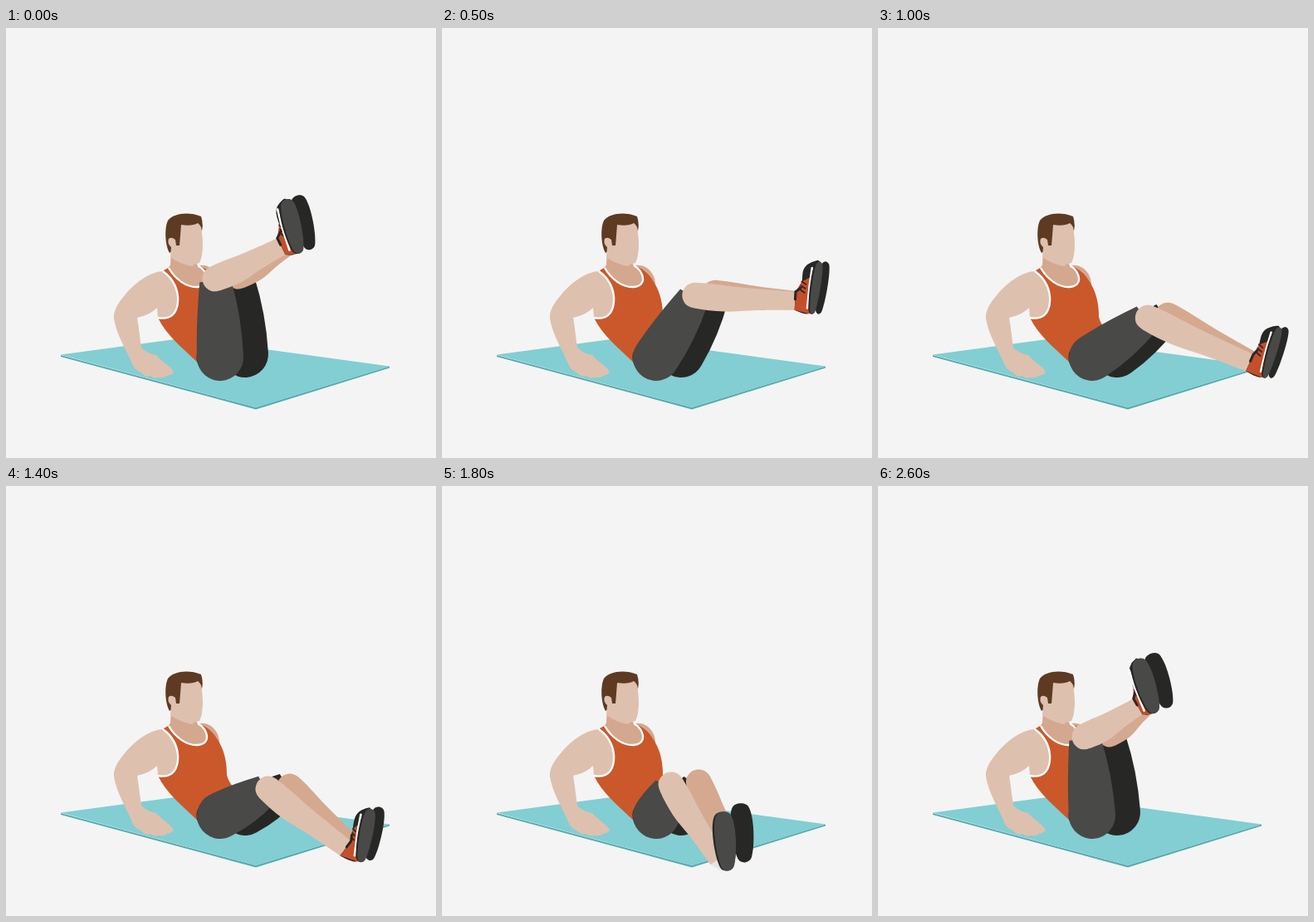
Write an HTML page that moves like this. It is 518 px wide and 518 px high and loops after 2.7 s.

```html
<!DOCTYPE html>
<html lang="en">
<head>
<meta charset="utf-8">
<title>Leg circles</title>
<style>
html, body { margin: 0; width: 100%; height: 100%; overflow: hidden; background: #f4f4f4; }
svg { display: block; width: 100%; height: 100%; }
</style>
</head>
<body>
<svg viewBox="0 0 518 518">
  <rect width="518" height="518" fill="#f4f4f4"/>
  <path d="M66 394L301 457L462 407.500V409.500L301 459.500L66 396Z" fill="#57abb3"/>
  <path d="M66 393.500L214.500 373.500L462 407.500L301 457Z" fill="#82ced2"/>

  <path d="M229 287C242 282 258 292 257 312L238 312Z" fill="#d4a78f"/>
  <path d="M190 292L197 288C205 286 225 284 231 286C246 291 251 299 257 309C263 320 266 332 266 348C268 356 272 361 276 365L262 395L231 403C212 385 194 371 183 349Z" fill="#cb582a"/>
  <path d="M199 268L198 285L196 289C204 303 218 313 231 312C242 311 245 303 239 293Q235 288 231 287L226 276Z" fill="#d4a78f"/>
  <path d="M196 289C204 303 218 313 231 312C242 311 245 303 239 293Q235 288 231 286" fill="none" stroke="#fff" stroke-width="2.400"/>
  <path d="M190 293C175 293 157 305 143 322C135 331 129 341 130 350C133 370 145 387 153 407C156 413 162 414 166 418Q169 421 174 419Q179 423 184 421Q191 422 194 419Q201 418 202 414C197 406 184 399 181 394Q170 392 163 385C161 371 160 360 158 349C168 347 177 342 182 337L183 349C198 352 207 345 207 329C207 313 200 302 190 293Z" fill="#dec0af"/>
  <path d="M189 293C202 302 208 316 207 330C206 344 198 352 183 349" fill="none" stroke="#fff" stroke-width="2.400"/>
  <path d="M197 271C191 261 191 240 195 232C202 223 220 221 235 227Q238 236 236 244L228 246L208 263Z" fill="#5e3a23"/>
  <path d="M211 237Q224 239 231 235Q236 238 236 247C238 261 237 276 233 283L226 285L225 287Q210 285 198 276L199 264Q194 260 196 254Q199 251 204 255L205 262L209 262L210 250Z" fill="#dec0af"/>
  <g id="legs"></g>
</svg>
<script>
const LOOP = 2700, STEP = 100;
const DARK = '#272825', GREY = '#494947', SKIN = '#dec0af', SHADE = '#d4a990', RED = '#c54e2b';
const HIP = [258, 397], FAR_HIP = [288, 393];

// Time, centre of the near sole, near knee.
const keys = [
  [0, 345, 239, 252, 302],
  [300, 419, 265, 277, 307],
  [700, 470, 361, 328, 338],
  [1050, 472, 395, 324, 351],
  [1400, 433, 421, 316, 365],
  [1800, 341, 428, 276, 360],
  [2200, 281, 357, 250, 326],
  [2600, 323, 241, 249, 302]
];

const legs = document.getElementById('legs');
function add(fill, stroke, width = 0) {
  const path = document.createElementNS('http://www.w3.org/2000/svg', 'path');
  const attrs = { fill, stroke: stroke || 'none', 'stroke-width': width, 'stroke-linecap': 'round' };
  for (const name in attrs) path.setAttribute(name, attrs[name]);
  return legs.appendChild(path);
}
const parts = {
  farThigh: add(DARK),
  farCalf: add(SHADE),
  farSole: add(DARK),
  waist: add('none', DARK, 3),
  thigh: add(GREY),
  calf: add(SKIN),
  upper: add(DARK),
  red: add(RED),
  laces: add('none', DARK, 1.8),
  collar: add('none', DARK, 3),
  trim: add('none', '#fff', 2.6),
  rim: add(DARK),
  sole: add(GREY)
};
const draw = (name, d) => parts[name].setAttribute('d', d);
const poly = pts => 'M' + pts.map(p => p.map(v => v.toFixed(2))).join('L');
const shift = ([x, y], dx, dy) => [x + dx, y + dy];
const clamp = v => Math.min(1, Math.max(0, v));

// Periodic Hermite interpolation of the key poses.
function pose(t) {
  const n = keys.length;
  const i = keys.filter(k => k[0] <= t).length - 1;
  const [a, b, c, d] = [-1, 0, 1, 2].map(o => {
    const k = i + o, [time, ...v] = keys[(k + n) % n];
    return { time: time + Math.floor(k / n) * LOOP, v };
  });
  const h = c.time - b.time, u = (t - b.time) / h, u2 = u * u, u3 = u2 * u;
  return b.v.map((p, j) => {
    const q = c.v[j];
    const m = (q - a.v[j]) / (c.time - a.time) * h;
    const k = (d.v[j] - p) / (d.time - b.time) * h;
    return (2 * u3 - 3 * u2 + 1) * p + (u3 - 2 * u2 + u) * m + (3 * u2 - 2 * u3) * q + (u3 - u2) * k;
  });
}

// Maps (along, across) in pixels onto the axis from a to b.
function axis(a, b) {
  const len = Math.hypot(b[0] - a[0], b[1] - a[1]);
  const dx = (b[0] - a[0]) / len, dy = (b[1] - a[1]) / len;
  return { len, at: (f, s) => [a[0] + dx * f - dy * s, a[1] + dy * f + dx * s] };
}

// Closed smooth outline; the listed indices keep a sharp corner.
function blob(pts, corners = []) {
  const n = pts.length, at = i => pts[(i + n) % n];
  const gap = (p, q) => Math.hypot(q[0] - p[0], q[1] - p[1]);
  const slope = i => {
    if (corners.includes((i + n) % n)) return [0, 0];
    const a = at(i - 1), p = at(i), b = at(i + 1), sum = gap(a, p) + gap(p, b) || 1;
    return [(b[0] - a[0]) / sum, (b[1] - a[1]) / sum];
  };
  let d = 'M' + at(0);
  for (let i = 0; i < n; i++) {
    const p = at(i), q = at(i + 1), a = slope(i), b = slope(i + 1), r = gap(p, q) / 3;
    d += 'C' + [p[0] + a[0] * r, p[1] + a[1] * r, q[0] - b[0] * r, q[1] - b[1] * r, ...q].map(v => v.toFixed(2));
  }
  return d + 'Z';
}

// Round at the hip, cut straight at the hem.
function thigh(hip, knee) {
  const { len, at } = axis(hip, knee), r = 28, hem = len - 3;
  const [a, b, c, d] = [at(hem, -19), at(hem, 19), at(0, r), at(0, -r)];
  return `M${a}L${b}Q${at(len * .5, r + 1)} ${c}A${r} ${r} 0 0 1 ${d}Q${at(len * .4, -r + 1)} ${a}Z`;
}

// Round knee, fuller at the back, cut straight at the ankle.
function calf(knee, ankle) {
  const { len, at } = axis(knee, ankle);
  return blob([
    at(len, -11), at(len, 11), at(len * .6, 14), at(len * .3, 17.5), at(0, 15.5),
    at(-11, 11), at(-15.5, 0), at(-11, -11), at(0, -15.5), at(len * .5, -12.5)
  ], [0, 1]);
}

// The sole leans with the place of the foot; f runs toe to heel, s towards the ankle.
function shoe(centre, lean, turn) {
  const len = 72 - 8 * turn, dx = Math.sin(lean) * len / 2, dy = Math.cos(lean) * len / 2;
  const { at } = axis(shift(centre, -dx, -dy), shift(centre, dx, dy));
  return (f, s) => at(f * len, s);
}

// Rounded sole, narrower at the heel.
function sole(at, w, off = 0) {
  const pts = [];
  for (let i = 0; i < 16; i++) {
    const a = i * Math.PI / 8, f = (1 - Math.cos(a)) / 2;
    const s = Math.sign(Math.sin(a)) * Math.abs(Math.sin(a)) ** .6;
    pts.push(at(f, s * w * (1.08 - .24 * f) + off));
  }
  return blob(pts);
}

function render(t) {
  const [x, y, kx, ky] = pose(t), foot = [x, y], knee = [kx, ky];
  const lean = (86 - .175 * x - .05 * y) * Math.PI / 180;
  const turn = clamp((x - 270) / 130 - (y - 240) / 400), side = turn * turn;
  const w = 14 - 7.5 * side, edge = w + 11 * side, reach = 22 * turn ** .3;

  const at = shoe(foot, lean, turn);
  const farAt = shoe(shift(foot, 22 - 14 * turn, -11 * (1 - turn)), lean, turn);
  const farKnee = shift(knee, 34 - 10 * turn, -3);
  const ankle = at(.8, reach);

  draw('farThigh', thigh(FAR_HIP, farKnee));
  draw('farCalf', calf(farKnee, farAt(.8, reach)));
  draw('farSole', sole(farAt, w));
  draw('thigh', thigh(HIP, knee));
  draw('calf', calf(knee, ankle));

  const { len, at: leg } = axis(knee, ankle), top = leg(len, -11), low = leg(len, 11);
  draw('upper', blob([at(0, 0), at(.07, edge * .7), at(.2, edge), at(.48, edge), top, low, at(.98, w * .4)], [4, 5]));
  draw('red', poly([at(.42, edge), top, low, at(1, w * .3), at(.7, 0), at(.3, w)]) + 'Z');
  draw('laces', [.42, .5, .58].map(f => poly([at(f, edge), at(f + .04, (edge + w) / 2)])).join(''));
  draw('collar', poly([at(.54, edge), top, leg(len, -2)]));
  draw('trim', poly([at(.14, w + 1), at(.45, w + 1), at(.9, w * .8 + 1)]));
  for (const name of ['upper', 'red', 'laces', 'collar', 'trim'])
    parts[name].setAttribute('opacity', clamp(side * 8));
  draw('rim', sole(at, w, .6));
  draw('sole', sole(at, w - 1, -.6));
}

draw('waist', 'M235 386Q226 397 237 412');
function tick() {
  render(Math.floor(performance.now() % LOOP / STEP) * STEP);
  requestAnimationFrame(tick);
}
tick();
</script>
</body>
</html>
```
